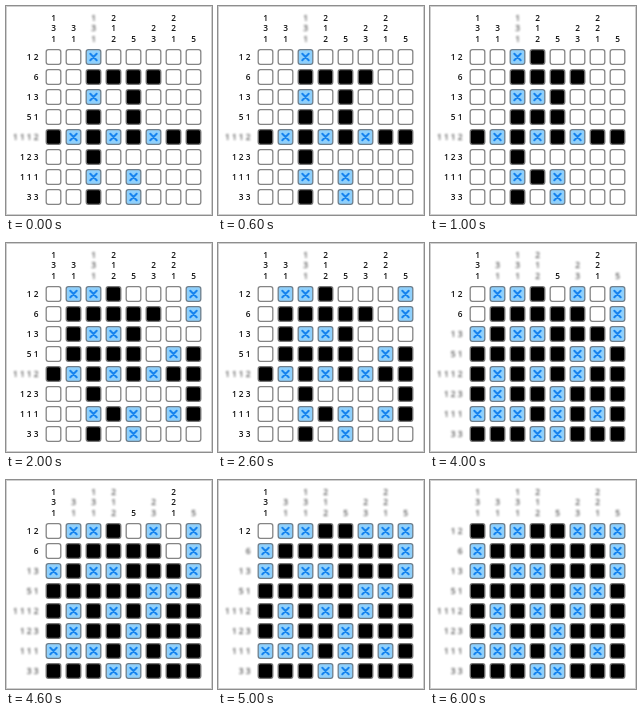
Animation of 206 by 209 pixels, one loop 7000 ms. Source, as an HTML page:

```html
<!DOCTYPE html>
<html lang="en">
<head>
<meta charset="utf-8">
<title>Nonogram solver</title>
<style>
  html, body { margin: 0; width: 100%; height: 100%; overflow: hidden; background: #fff; }
  svg { display: block; width: 206px; height: 209px; }
  text { font: 600 8.3px "Open Sans", "Noto Sans", sans-serif; fill: #111; }
  .done { filter: blur(1.1px); opacity: .72; }
  .box { fill: #fff; stroke: #858585; stroke-width: 1.3; }
  .fill .box { fill: #000; stroke: #777; }
  .cross .box { fill: #8fd0fc; stroke: #6f7f8c; }
  .mark { display: none; fill: none; stroke: #1683ee; stroke-width: 2; stroke-linecap: round; }
  .cross .mark { display: inline; }
</style>
</head>
<body>
<svg id="stage" viewBox="0 0 206 209">
  <rect x=".5" y=".5" width="205" height="208" fill="#fff" stroke="#cfcfcf"/>
</svg>
<script>
const STEP = 1000, STEPS = 7, SIZE = 8, PITCH = 20, X0 = 47.5, Y0 = 51;

const solution = [
  '#..##...', '.######.', '.#..###.', '#####..#',
  '#.#.#.##', '#.##.###', '...#.#.#', '###..###'
];
// The step at which each cell becomes known.
const known = [
  '62015452', '52000052', '42010443', '42010322',
  '00000000', '43044342', '33010322', '43040333'
];

const stage = document.getElementById('stage');
const range = [...Array(SIZE).keys()];
const column = (grid, c) => grid.map(row => row[c]).join('');
const runs = line => line.match(/#+/g).map(run => run.length);
const doneAt = line => Math.max(...line);

function add(parent, tag, attrs, label = '') {
  const el = document.createElementNS('http://www.w3.org/2000/svg', tag);
  for (const key in attrs) el.setAttribute(key, attrs[key]);
  el.textContent = label;
  return parent.appendChild(el);
}

const cells = [];
const clues = [];

for (const i of range) {
  const rowClue = add(stage, 'g', {});
  add(rowClue, 'text', { x: 32.5, y: Y0 + i * PITCH + 3, 'text-anchor': 'end' },
    runs(solution[i]).join(' '));
  clues.push({ el: rowClue, at: doneAt([...known[i]]) });

  const colClue = add(stage, 'g', {});
  runs(column(solution, i)).reverse().forEach((n, k) =>
    add(colClue, 'text', { x: X0 + i * PITCH, y: 36 - k * 10.7, 'text-anchor': 'middle' }, n));
  clues.push({ el: colClue, at: doneAt([...column(known, i)]) });

  for (const c of range) {
    const el = add(stage, 'g', { transform: `translate(${X0 + c * PITCH} ${Y0 + i * PITCH})` });
    add(el, 'rect', { class: 'box', x: -7.3, y: -7.3, width: 14.6, height: 14.6, rx: 2.2 });
    add(el, 'path', { class: 'mark', d: 'M-3.2-3.2 3.2 3.2M3.2-3.2-3.2 3.2' });
    cells.push({ el, at: +known[i][c], look: solution[i][c] === '#' ? 'fill' : 'cross' });
  }
}

function show(step) {
  for (const { el, at, look } of cells) el.setAttribute('class', step >= at ? look : '');
  for (const { el, at } of clues) el.setAttribute('class', step >= at ? 'done' : '');
}

const start = performance.now();
let shown = -1;

function tick() {
  const step = Math.floor((performance.now() - start) / STEP) % STEPS;
  if (step !== shown) show(shown = step);
  requestAnimationFrame(tick);
}
tick();
</script>
</body>
</html>
```
